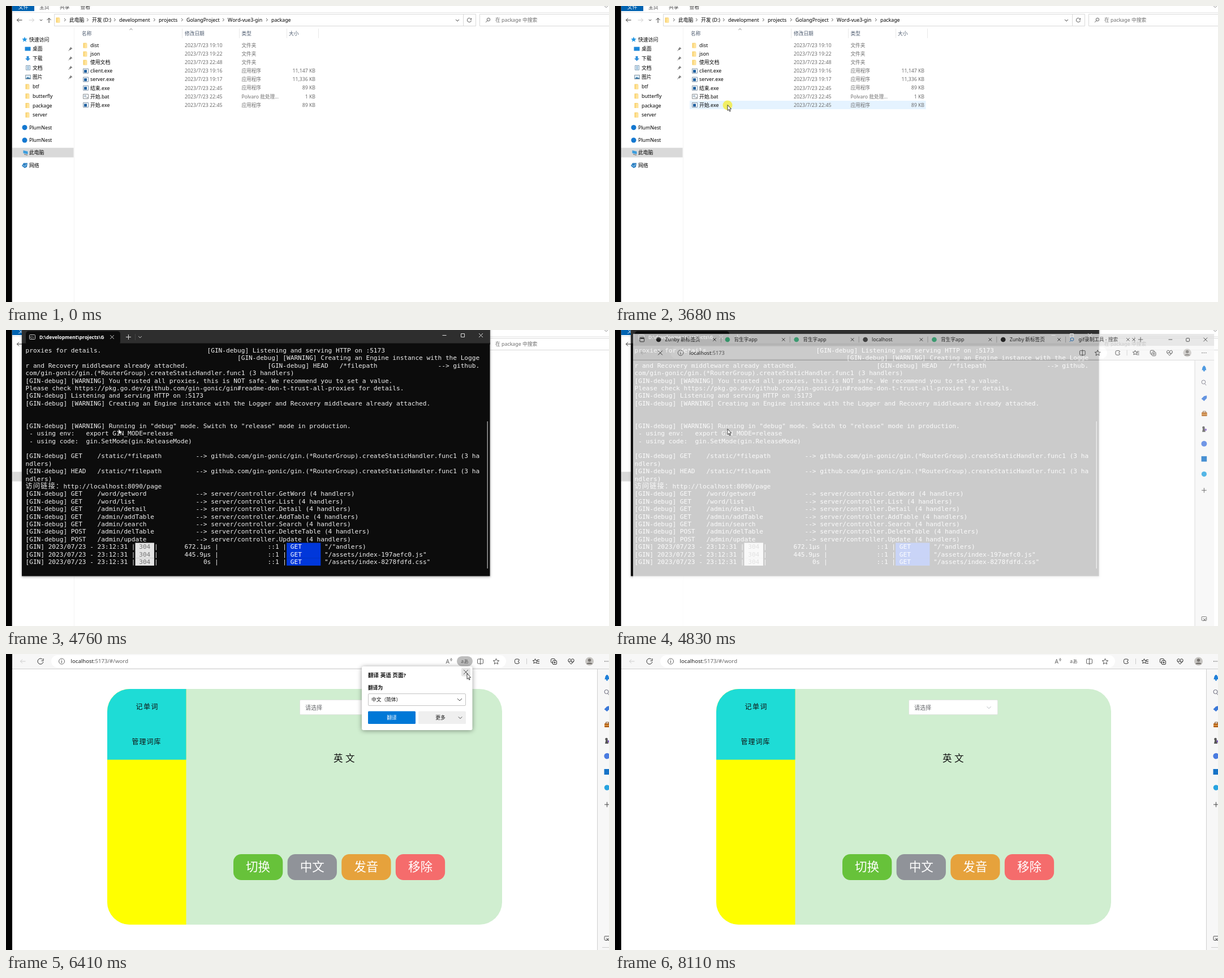
Animation of 1066 by 525 pixels, one loop 9190 ms. Source, as an HTML page with a canvas:

```html
<!DOCTYPE html>
<html lang="zh">
<head>
<meta charset="utf-8">
<style>
  html, body { margin: 0; width: 100%; height: 100%; overflow: hidden; background: #fff; }
  canvas { display: block; }
</style>
</head>
<body>
<canvas id="stage" width="1066" height="525"></canvas>
<script>
const stage = document.getElementById('stage');
const layer = stage.cloneNode();
const [stageCtx, layerCtx] = [stage, layer].map(canvas => {
  const context = canvas.getContext('2d');
  context.fontKerning = 'none';
  return context;
});
let ctx = stageCtx;
const LOOP = 9190;
const SANS = '"Noto Sans", "Noto Sans CJK SC", "Noto Sans CJK", sans-serif';
const CJK = '"Noto Sans CJK SC", "Noto Sans CJK", sans-serif';
const MONO = '"DejaVu Sans Mono", "Noto Sans CJK SC", monospace';

// Drawing helpers
function rect(x, y, w, h, fill) {
  ctx.fillStyle = fill;
  ctx.fillRect(x, y, w, h);
}
function round(x, y, w, h, r, fill, stroke) {
  ctx.beginPath();
  ctx.roundRect(x, y, w, h, r);
  if (fill) { ctx.fillStyle = fill; ctx.fill(); }
  if (stroke) { ctx.strokeStyle = stroke; ctx.lineWidth = 1; ctx.stroke(); }
}
function dot(x, y, r, fill) {
  ctx.beginPath();
  ctx.arc(x, y, r, 0, 7);
  ctx.fillStyle = fill;
  ctx.fill();
}
function ring(x, y, r, color, from = 0, to = 6.3) {
  ctx.beginPath();
  ctx.arc(x, y, r, from, to);
  ctx.strokeStyle = color;
  ctx.lineWidth = 1;
  ctx.stroke();
}
function trace(points, x = 0, y = 0) {
  ctx.beginPath();
  for (let i = 0; i < points.length; i += 2) ctx.lineTo(x + points[i], y + points[i + 1]);
}
function line(color, points, x, y, width = 1) {
  trace(points, x, y);
  ctx.strokeStyle = color;
  ctx.lineWidth = width;
  ctx.stroke();
}
function poly(fill, points, x, y) {
  trace(points, x, y);
  ctx.fillStyle = fill;
  ctx.fill();
}
// y is the middle of the text line
function text(s, x, y, color = '#000', size = 8.8, { align = 'left', family = SANS, weight = 400 } = {}) {
  ctx.font = `${weight} ${size}px ${family}`;
  ctx.textAlign = align;
  ctx.fillStyle = color;
  ctx.fillText(s, x, y + size * 0.36);
}
function spread(s, x, y, pitch, size, color = '#111') {
  [...s].forEach((c, i) => text(c, x + i * pitch, y, color, size, { family: CJK }));
}
function shadowed(blur, opacity, draw) {
  ctx.save();
  ctx.shadowColor = `rgba(0,0,0,${opacity})`;
  ctx.shadowBlur = blur;
  ctx.shadowOffsetY = 1;
  draw();
  ctx.restore();
}
const chevronRight = (x, y) => line('#555', [-1.5, -2.5, 1, 0, -1.5, 2.5], x, y);
const chevronDown = (x, y, r = 3, color = '#444') => line(color, [-r, -r / 2, 0, r / 2, r, -r / 2], x, y);
const cross = (x, y, r, color) => {
  line(color, [-r, -r, r, r], x, y);
  line(color, [-r, r, r, -r], x, y);
};
const plus = (x, y, r, color) => {
  line(color, [-r, 0, r, 0], x, y);
  line(color, [0, -r, 0, r], x, y);
};
const arrow = (x, y, color, dir = -1) => {
  line(color, [-4.5, 0, 4.5, 0], x, y);
  line(color, [dir, -3.5, dir * 4.5, 0, dir, 3.5], x, y);
};
const starPoints = r => Array.from({ length: 22 }, (_, i) => {
  const k = i >> 1, radius = k % 2 ? r * 0.45 : r, a = k * Math.PI / 5 - Math.PI / 2;
  return radius * (i % 2 ? Math.sin(a) : Math.cos(a));
});
function reload(x, y, r, color) {
  ring(x, y, r, color, 0.2, 5.5);
  line(color, [r, -r, r, -1, 1.5, -1], x, y);
}
function magnifier(x, y, color) {
  ring(x, y, 3, color);
  line(color, [-2, 2, -4.5, 4.5], x, y);
}
function folder(x, y) {
  rect(x - 3.5, y - 4.5, 6, 9, '#f7cf68');
  rect(x - 1.5, y - 3.5, 5, 8, '#ffe39a');
}

// File manager
const FILES = [
  ['dist', '19:10', '文件夹'], ['json', '19:22', '文件夹'], ['使用文档', '22:48', '文件夹'],
  ['client.exe', '19:16', '应用程序', '11,147 KB'], ['server.exe', '19:17', '应用程序', '11,336 KB'],
  ['结束.exe', '22:45', '应用程序', '89 KB'], ['开始.bat', '22:45', 'Polvaro 批处理...', '1 KB'],
  ['开始.exe', '22:45', '应用程序', '89 KB'],
];
const CRUMBS = [['此电脑', 112], ['开发 (D:)', 152], ['development', 200], ['projects', 270],
  ['GolangProject', 319], ['Word-vue3-gin', 392], ['package', 469]];

function fileIcon([name, , type], y) {
  if (type === '文件夹') return folder(140, y);
  if (name.endsWith('.bat')) {
    round(136.5, y - 4, 9, 8, 0, '#fff', '#8a8f94');
    ring(140, y - 0.5, 1.5, '#7f99ad');
    return line('#8a8f94', [142, 2, 145, 2], 0, y);
  }
  round(136.5, y - 4, 9, 8, 0, '#fff', '#8094a8');
  rect(138, y - 2, 5, 5, '#1d5f9f');
}

function navigation() {
  poly('#2196e3', starPoints(5), 33, 59.5);
  text('快速访问', 41, 59.5);
  rect(33.5, 72.5, 10, 7, '#1a86d9');
  poly('#2f8fdc', [-2, -4, 2, -4, 2, 0, 4.5, 0, 0, 4.5, -4.5, 0, -2, 0], 38.5, 93);
  round(35.5, 105.5, 7, 8, 0, '#fff', '#7f9db5');
  [107.5, 109.5, 111.5].forEach(y => line('#5e9bc9', [37, y, 41, y]));
  round(34.5, 122.5, 9, 7, 0, '#dcebf5', '#8c9aa5');
  poly('#3a79a8', [35, 129, 38, 126, 43, 128, 43, 129]);
  ['桌面', '下载', '文档', '图片', 'btf', 'butterfly', 'package', 'server'].forEach((name, i) => {
    const y = 76 + i * 16.75;
    text(name, 47, y);
    if (i > 3) return folder(38, y);
    poly('#777', [0, -3.5, 3.5, 0, 1, 0.5, 0, 2.5, -2.5, 0, -0.5, -1], 114, y);
    line('#777', [-3.5, 3.5, -1, 1], 114, y);
  });
  for (const y of [215.5, 238]) {
    dot(33, y, 4.5, '#1478d0');
    text('PlumNest', 41, y);
  }
  rect(11, 251.5, 108.5, 17, '#d9d9d9');
  poly('#3c9ddd', [-4, -4, 4, -2, 4, 3, -4, 1], 34.5, 260);
  line('#666', [-2, 3, 4, 4.5], 34, 260);
  text('此电脑', 41, 260);
  poly('#2f80c2', [-2, -4, 5, -4, 4, 3, 0, 5, -5, 1], 33, 282.5);
  line('#a8d8f5', [-3, 0, 1, 2, 3, -2], 33, 282.5);
  text('网络', 41, 282.5);
}

function explorer(rowColor) {
  rect(0, 0, 1066, 525, '#fff');
  rect(11, 0, 39, 9, '#0063b1');
  text('文件', 30.5, 2, '#fff', 8.8, { align: 'center' });
  [['主页', 59], ['共享', 95], ['查看', 131.5]].forEach(([s, x]) => text(s, x, 2, '#333'));
  chevronDown(1061, 1, 3.5, '#888');
  rect(11, 11, 1055, 1, '#e4e4e4');

  arrow(24, 25, '#333');
  arrow(45, 25, '#ccc', 1);
  chevronDown(62, 25, 2.2);
  line('#333', [0, 4.5, 0, -4], 76, 25.5);
  line('#333', [-3.5, -0.5, 0, -4, 3.5, -0.5], 76, 25.5);
  round(85.5, 14.5, 745, 21, 0, '#fff', '#d9d9d9');
  line('#d9d9d9', [808.5, 15, 808.5, 35]);
  folder(92, 25);
  CRUMBS.forEach(([s, x]) => { chevronRight(x - 7.5, 24.5); text(s, x, 25); });
  chevronDown(798, 25.5);
  reload(819, 25, 3.5, '#555');
  round(837.5, 14.5, 240, 21, 0, '#fff', '#d9d9d9');
  ring(853, 24, 2.7, '#666');
  line('#666', [-2, 2, -5, 5], 853, 24);
  text('在 package 中搜索', 865, 25, '#6d6d6d');

  rect(120, 37, 1, 488, '#f3f3f3');
  [['名称', 134], ['修改日期', 316], ['类型', 416.5], ['大小', 500]]
    .forEach(([s, x]) => text(s, x, 48.5, '#4c5a6e', 8.7));
  [311, 412, 496, 552].forEach(x => rect(x, 40, 1, 17, '#e8e8e8'));
  line('#888', [-2.5, 1.5, 0, -1, 2.5, 1.5], 221, 41);

  if (rowColor) rect(132, 168, 417.5, 15, rowColor);
  FILES.forEach((file, i) => {
    const y = 70 + i * 15.07, [name, time, type, size] = file;
    fileIcon(file, y);
    text(name, 149, y);
    text('2023/7/23 ' + time, 316, y, '#6d6d6d');
    text(type, 416.5, y, '#6d6d6d', 8.6);
    if (size) text(size, 547, y, '#6d6d6d', 8.7, { align: 'right' });
  });
  navigation();
}

// Terminal
const COL = 6.69, ROW = 13.39;
const HANDLER = 'github.com/gin-gonic/gin.(*RouterGroup).createStaticHandler.func1 (3 handlers)';
const indent = (col, s) => ' '.repeat(col) + s;
const route = (method, path, target) => `[GIN-debug] ${method.padEnd(7)}${path.padEnd(26)}--> ${target}`;
const handler = (method, path, name) => route(method, path, `server/controller.${name} (4 handlers)`);
const staticRoute = method => {
  const s = route(method, '/static/*filepath', HANDLER);
  return [s.slice(0, 120), s.slice(120)];
};
const LOG = [
  'proxies for details.'.padEnd(48) + '[GIN-debug] Listening and serving HTTP on :5173',
  indent(56, '[GIN-debug] [WARNING] Creating an Engine instance with the Logge'),
  'r and Recovery middleware already attached.'.padEnd(64) + route('HEAD', '/*filepath', 'github.'),
  HANDLER.slice(7),
  '[GIN-debug] [WARNING] You trusted all proxies, this is NOT safe. We recommend you to set a value.',
  'Please check https://pkg.go.dev/github.com/gin-gonic/gin#readme-don-t-trust-all-proxies for details.',
  '[GIN-debug] Listening and serving HTTP on :5173',
  '[GIN-debug] [WARNING] Creating an Engine instance with the Logger and Recovery middleware already attached.',
  '', '',
  '[GIN-debug] [WARNING] Running in "debug" mode. Switch to "release" mode in production.',
  ' - using env:   export GIN_MODE=release',
  ' - using code:  gin.SetMode(gin.ReleaseMode)',
  '',
  ...staticRoute('GET'), ...staticRoute('HEAD'),
  indent(10, 'http://localhost:8090/page'),
  handler('GET', '/word/getword', 'GetWord'), handler('GET', '/word/list', 'List'),
  handler('GET', '/admin/detail', 'Detail'), handler('GET', '/admin/addTable', 'AddTable'),
  handler('GET', '/admin/search', 'Search'), handler('POST', '/admin/delTable', 'DeleteTable'),
  handler('POST', '/admin/update', 'Update'),
];
const REQUESTS = [['672.1µs', '"/"andlers)'], ['445.9µs', '"/assets/index-197aefc0.js"'],
  ['0s', '"/assets/index-8278fdfd.css"']];

function terminalLog(showRequests) {
  const ink = '#f0f0f0';
  const write = (s, col, row, color = ink) =>
    text(s, 34.5 + col * COL, 36 + row * ROW, color, COL / 0.602, { family: MONO });
  LOG.forEach((s, row) => write(s, 0, row));
  spread('访问链接：', 34.5, 36 + 18 * ROW, 2 * COL, 12, ink);
  if (showRequests) REQUESTS.forEach(([time, path], i) => {
    const row = LOG.length + i, y = 36 + row * ROW - ROW / 2;
    rect(34.5 + 29 * COL, y, 5 * COL, ROW + 0.3, '#e4e4e4');
    rect(34.5 + 69 * COL, y, 9 * COL, ROW + 0.3, '#0037da');
    write('[GIN] 2023/07/23 - 23:12:31 |', 0, row);
    write('304', 30, row, '#767676');
    write('| ' + time.padStart(13) + ' | ' + '::1'.padStart(15) + ' |', 34, row);
    write('GET', 70, row, '#fff');
    write(path, 79, row);
  });
  rect(850.5, 162, 1.5, 261, '#9a9a9a');
}

function terminal(t) {
  ctx.save();
  if (t < 4550) ctx.globalAlpha = 0.6;
  shadowed(4, 0.35, () => rect(28, -10, 827.5, 446.5, '#0c0c0c'));
  rect(28, 0, 827.5, 23.5, '#2e2e2e');
  round(35, 2, 167, 24, 5, '#0c0c0c');
  round(41.5, 8.5, 10, 8, 1, null, '#ccc');
  text('C:\\', 43, 13, '#ccc', 4.5, { weight: 700 });
  ctx.save();
  ctx.beginPath();
  ctx.rect(56, 0, 117.5, 24);
  ctx.clip();
  text('D:\\development\\projects\\GolangProject', 59, 12.5, '#fff', 8.4, { weight: 600 });
  ctx.restore();
  cross(187.5, 12.5, 3.2, '#ddd');
  plus(216.5, 12.5, 4.5, '#ddd');
  line('#444', [228.5, 7, 228.5, 18]);
  chevronDown(237, 12.5, 2.8, '#ccc');
  line('#ddd', [771.5, 9.5, 778.5, 9.5]);
  round(804.5, 6.5, 6, 6, 0, null, '#ddd');
  cross(839.5, 9.5, 3.5, '#ddd');
  if (t >= 4690) terminalLog(t >= 4760);
  ctx.restore();
}

// Browser
const TABS = ['Zunby 新标签页', '背生字app', '背生字app', 'localhost', '背生字app', 'Zunby 新标签页', 'gif录制工具 - 搜索'];
const TAB_COLORS = { Z: '#222', 背: '#41b883', l: '#444' };

function tabStrip() {
  rect(11, -22, 1070, 22, '#e2e2e2');
  round(23.5, -15.5, 8, 8, 1, null, '#333');
  line('#333', [24, -13.5, 31, -13.5], 0, 0, 2);
  TABS.forEach((title, i) => {
    const x = 58 + i * 126.9;
    if (i === 6) magnifier(x, -12, '#1a73c8');
    else dot(x, -11.5, 4.5, TAB_COLORS[title[0]]);
    text(title, x + 12, -11.5, '#222', 9);
    cross(x + 103, -11.5, 2.8, '#333');
    line('#aaa', [x + 115, -17, x + 115, -6]);
  });
  cross(933, -11.5, 2.8, '#333');
  plus(945.5, -11.5, 4.5, '#333');
  line('#222', [997, -11.5, 1004, -11.5]);
  round(1029.5, -14, 6, 6, 1, null, '#222');
  cross(1065, -11.5, 3.5, '#222');
}

function toolbar(loaded, popup) {
  rect(11, 0, 1070, 26, '#f7f7f7');
  rect(11, 26, 1070, 1, '#cfcfcf');
  arrow(30, 13, '#ccc');
  if (loaded) reload(61, 13, 5, '#333'); else cross(61, 13, 4, '#333');
  round(80, 2, 804, 22, 11, '#fff');
  ring(98.5, 13, 5, '#666');
  line('#555', [98.5, 12, 98.5, 16]);
  rect(98, 10, 1, 1, '#555');
  text('localhost', 114.5, 13, '#222', 9.6);
  const host = ctx.measureText('localhost').width;
  text(loaded ? ':5173/#/word' : ':5173', 114.5 + host, 13, '#666', 9.6);
  if (loaded) {
    text('A', 777.5, 13.5, '#666', 10);
    ring(784, 10, 2, '#666', -0.8, 0.8);
    ring(784, 10, 4, '#666', -0.8, 0.8);
    if (popup) round(797, 4, 28, 17.5, 8.7, '#bdbdbd');
    text('aあ', 811, 13, '#555', 8.5, { align: 'center' });
  }
  round(833.5, 9, 10, 8, 1, null, '#666');
  line('#666', [838.5, 7, 838.5, 19]);
  line('#555', starPoints(5.5), 866.5, 13.5);
  round(899.5, 9, 8, 8, 2.5, null, '#333');
  dot(908, 13, 1.7, '#f7f7f7');
  ring(907, 13, 1.5, '#333', 1.6, 4.7);
  line('#ccc', [920.5, 8, 920.5, 18]);
  line('#333', starPoints(4.5), 935.5, 13);
  [10.5, 13.5, 16.5].forEach(y => line('#333', [939, y, 943, y]));
  round(963.5, 8.5, 7, 7, 1.5, null, '#333');
  round(966.5, 11.5, 7, 7, 1.5, '#f7f7f7', '#333');
  plus(970, 15, 2, '#333');
  line('#333', [0, 5, -5, 0, -5, -3, -3, -4.5, 0, -3, 3, -4.5, 5, -3, 5, 0, 0, 5], 999, 13);
  line('#333', [-4, 0, -1, 0, 0, -2, 1, 2, 4, 0], 999, 13);
  dot(1031.5, 13, 7.5, '#c6c4c1');
  dot(1031.5, 11, 2.8, '#77736f');
  ctx.beginPath();
  ctx.ellipse(1031.5, 18, 5, 2.7, 0, Math.PI, 0);
  ctx.fill();
  [1059, 1062.5, 1066].forEach(x => dot(x, 13, 0.8, '#333'));
}

function sideBar() {
  rect(1045, 27, 36, 520, '#f7f7f7');
  rect(1045, 27, 1, 520, '#d0d0d0');
  const x = 1062.5;
  poly('#1f7fd8', [-4, 3, -3, -2, -1, -5, 1, -5, 3, -2, 4, 3], x, 42);
  dot(x, 46, 1.5, '#1f7fd8');
  ring(x - 1, 67, 3.5, '#667');
  line('#667', [1, 70, 4, 73], x, 0);
  poly('#3b78d8', [-5, 1, 0, -4, 5, -5, 5, 0, 0, 5], x, 97);
  round(x - 4.5, 123, 10, 7, 1, '#b5651d');
  line('#7a4a20', [-2, 123, -2, 121, 3, 121, 3, 123], x, 0);
  rect(x - 4.5, 126, 10, 1, '#f2b45b');
  dot(x - 1, 151, 2.3, '#555');
  poly('#555', [-3.5, 159, -2, 152, 1, 152, 2.5, 159], x, 0);
  dot(x + 3, 155, 2, '#8661c5');
  dot(x, 181, 5.2, '#4a7be0');
  rect(x - 5, 204, 10, 10, '#1673c7');
  dot(x, 237, 4.8, '#27a3e0');
  plus(x, 267, 4.5, '#444');
  round(x - 4.5, 500.5, 9, 7, 1, null, '#555');
  cross(x + 1, 506, 2.5, '#333');
  rect(1054, 520, 18, 1, '#ccc');
}

function page(cursor) {
  ctx.save();
  ctx.beginPath();
  ctx.roundRect(179, 62, 698, 418, 40);
  ctx.clip();
  rect(179, 62, 698, 418, '#d0eed0');
  rect(179, 62, 139.5, 418, '#ffff00');
  rect(179, 62, 139.5, 125.5, '#1edcd6');
  const hovering = cursor && cursor[0] < 318 && cursor[1] > 125 && cursor[1] < 187;
  if (hovering) rect(179, 125, 139.5, 62.5, '#18b0ab');
  ctx.restore();
  spread('记单词', 229.5, 93.5, 13.5, 12);
  spread('管理词库', 222.5, 156, 13, 12);
  spread('英文', 579, 185.5, 21, 16.5);
  round(519.5, 81.5, 157, 26, 1.5, '#fff', '#dfe5df');
  text('请选择', 529, 95, '#606266', 10, { family: CJK });
  chevronDown(661, 95, 3.5, '#b5b8be');
  [['切换', '#67c23a'], ['中文', '#909399'], ['发音', '#e6a23c'], ['移除', '#f56c6c']].forEach(([s, color], i) => {
    const x = 402 + i * 95.6;
    round(x, 355, 87.3, 46, 14, color);
    text(s, x + 43.6, 377.5, '#fff', 21.5, { align: 'center', family: CJK });
  });
}

function translatePopup(cursor) {
  shadowed(9, 0.4, () => round(629, 22, 195.5, 113, 3, '#fff'));
  if (cursor && cursor[0] > 805 && cursor[1] > 24 && cursor[1] < 40) round(805, 24.5, 16, 15, 2, '#e4e4e4');
  cross(813, 32, 4, '#555');
  text('翻译 英语 页面?', 640, 37.5, '#111', 9.6, { weight: 700 });
  text('翻译为', 640, 60, '#111', 8.7, { weight: 700 });
  round(640.5, 70.5, 172, 21, 1.5, '#fff', '#c4c4c4');
  text('中文（简体）', 646, 81, '#111', 8.7, { family: CJK });
  chevronDown(802, 81, 4);
  round(640, 101.5, 84, 22.5, 1.5, '#0078d7');
  text('翻译', 682, 112.5, '#fff', 8.8, { align: 'center' });
  round(729, 101.5, 84, 22.5, 1.5, '#efefef');
  text('更多', 768, 112.5, '#111', 8.8, { align: 'center' });
  chevronDown(803, 113, 3.2);
}

// The window is painted on its own layer, so that it fades in as one piece
function browser(t, cursor) {
  const loaded = t >= 4970, popup = t >= 5100 && t < 6810;
  const [scale, alpha] = t < 4900 ? [0.96, 0.79] : t < 4970 ? [0.99, 0.97] : [1, 1];
  const shift = (1 - scale) / 0.04;
  ctx = layerCtx;
  ctx.clearRect(0, 0, 1066, 525);
  ctx.save();
  ctx.translate(21.4 * shift, 28 * shift);
  ctx.scale(scale, scale);
  rect(11, 27, 1034, 520, '#fff');
  tabStrip();
  toolbar(loaded, popup);
  sideBar();
  if (loaded) page(cursor);
  if (popup) translatePopup(cursor);
  ctx.restore();
  ctx = stageCtx;
  ctx.globalAlpha = alpha;
  ctx.drawImage(layer, 0, 0);
  ctx.globalAlpha = 1;
}

// Pointer: [start, end, steps, from, to]; it moves in discrete steps
const MOVES = [
  [510, 860, 6, [974, 496], [371, 196]],
  [1080, 1200, 3, [371, 196], [367, 195]],
  [1480, 1960, 8, [367, 195], [199, 175.5]],
  [5430, 6340, 14, [199, 175.5], [814, 34]],
  [6410, 6410, 1, [814, 34], [815, 34.5]],
  [6880, 7630, 12, [815, 34.5], [991.5, 121]],
  [7700, 8110, 7, [991.5, 121], [1023, 523]],
];
function pointer(t) {
  if (t < 510 || t >= 8110) return null;
  const [start, end, steps, from, to] = MOVES.findLast(m => t >= m[0]);
  const step = end > start ? Math.floor((t - start) / (end - start) * (steps - 1) + 1e-6) + 1 : 1;
  const u = Math.min(1, step / steps), e = u * u * (3 - 2 * u);
  return from.map((v, i) => v + (to[i] - v) * e);
}
function drawPointer([x, y], clicking) {
  if (clicking) dot(x, y + 0.5, 8.5, 'rgba(244,236,60,.8)');
  const shape = [0, 0, 0, 10, 2.2, 8, 3.8, 11.5, 5.2, 10.9, 3.7, 7.4, 6.6, 7.2, 0, 0];
  poly('#fff', shape, x, y);
  line('#111', shape, x, y, 0.8);
}

const CLICKS = [[3680, 3750], [3810, 3870], [6740, 6880]];

function frame(now) {
  const t = now % LOOP, cursor = pointer(t);
  const overRow = t < 4490 && cursor && cursor[1] < 183 && cursor[0] < 549;
  const rowColor = t >= 3750 ? '#cce8ff' : overRow ? '#e5f3ff' : null;
  if (t < 4970) explorer(rowColor);
  if (t >= 4490 && t < 4970) terminal(t);
  if (t >= 4830) browser(t, cursor);
  rect(0, 0, 10.7, 525, '#000');
  if (cursor) drawPointer(cursor, CLICKS.some(([a, b]) => t >= a && t < b));
  requestAnimationFrame(frame);
}
requestAnimationFrame(frame);
</script>
</body>
</html>
```
